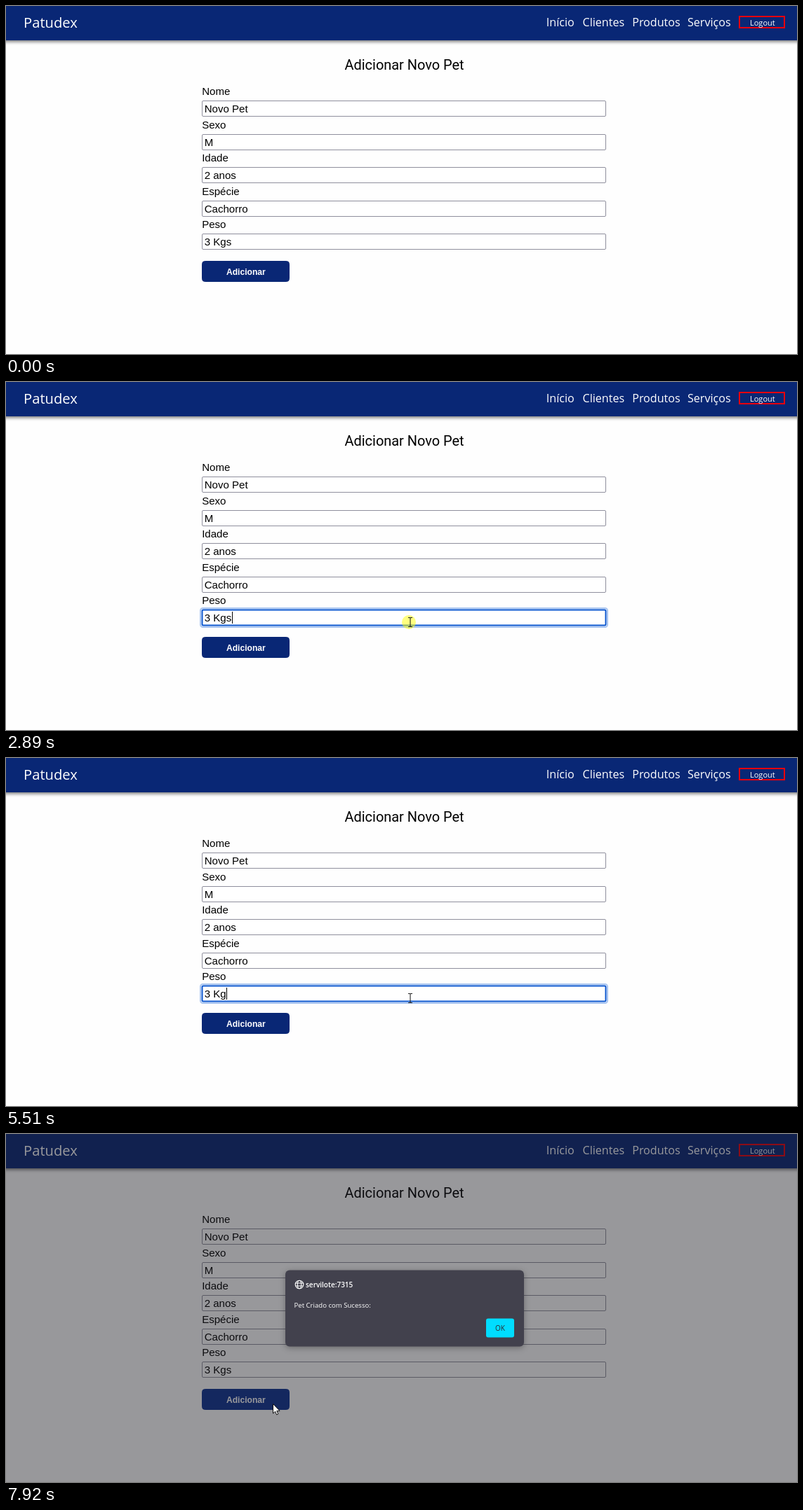
Write an HTML page that moves like this. It is 1127x497 px and loops after 8 s.

```html
<!DOCTYPE html>
<html lang="pt">
<head>
<meta charset="utf-8">
<title>Adicionar Novo Pet</title>
<style>
html, body { margin: 0; width: 100%; height: 100%; overflow: hidden; background: #fefefe; }
svg { display: block; }
text { white-space: pre; }
.form { font: 15.05px "Liberation Sans", Arial, sans-serif; }
.ui { font-family: "Open Sans", "Noto Sans", sans-serif; fill: #fff; }
.field { fill: #fff; stroke: #8f8f9d; }
.field.hover { stroke: #5b5b66; }
.field.focus { stroke: #0b57d0; stroke-width: 2; }
.bold { font: bold 12.1px "Liberation Sans", Arial, sans-serif; fill: #fff; }
#button rect { fill: #092775; stroke: #092775; }
#button.hover rect { fill: #0f3391; stroke: #0f3391; }
#button.pressed rect { fill: #0b2c85; stroke: #0b2c85; }
#button.off rect { fill: #ccc; stroke: #999; }
#button.off text { fill: #666; }
</style>
</head>
<body>
<svg width="1127" height="497" viewBox="0 0 1127 497">
  <defs>
    <filter id="navShadow" x="-5%" y="-50%" width="110%" height="220%" color-interpolation-filters="sRGB">
      <feDropShadow dx="0" dy="2" stdDeviation="2.4" flood-opacity=".55"/>
    </filter>
    <filter id="boxShadow" x="-10%" y="-20%" width="120%" height="150%" color-interpolation-filters="sRGB">
      <feDropShadow dx="0" dy="2" stdDeviation="4" flood-opacity=".3"/>
    </filter>
  </defs>
  <rect width="1127" height="497" fill="#fefefe"/>

  <rect x="-20" y="-20" width="1167" height="69" fill="#092775" filter="url(#navShadow)"/>
  <g class="ui" font-size="16.1">
    <text x="25" y="31" font-size="20.2">Patudex</text>
    <text x="769.8" y="29">Início</text>
    <text x="821.5" y="29">Clientes</text>
    <text x="892.2" y="29">Produtos</text>
    <text x="971" y="29">Serviços</text>
    <rect x="1045" y="15" width="64" height="16" fill="none" stroke="#e8000d" stroke-width="2"/>
    <text x="1060" y="27.5" font-size="11">Logout</text>
  </g>

  <text x="482.5" y="91" font-family="Roboto, sans-serif" font-size="19.95">Adicionar Novo Pet</text>
  <g id="form" class="form"></g>
  <text id="error" class="form" x="279.2" y="365" fill="#f00">Esse campo é obrigatório</text>
  <rect id="caret" y="328" width="1" height="17"/>
  <g id="button">
    <rect x="279.5" y="364.5" width="124" height="29" rx="4"/>
    <text class="bold" x="314" y="384">Adicionar</text>
  </g>

  <g id="alert">
    <rect width="1127" height="497" fill="#1c1b22" fill-opacity=".45"/>
    <rect x="398" y="194.5" width="340" height="109" rx="6" fill="#42414d" filter="url(#boxShadow)"/>
    <g fill="none" stroke="#fff" stroke-width="1.1">
      <circle cx="418" cy="215" r="5.8"/>
      <ellipse cx="418" cy="215" rx="2.7" ry="5.8"/>
      <path d="M412.5 213h11M412.5 217h11"/>
    </g>
    <g class="ui">
      <text x="427" y="218.5" font-size="10" font-weight="600">servilote:7315</text>
      <text x="410.5" y="247.5" font-size="9.6">Pet Criado com Sucesso:</text>
    </g>
    <rect x="684" y="263.5" width="40" height="27" rx="3" fill="#00ddff"/>
    <text class="ui" x="704" y="281" font-size="10" text-anchor="middle" style="fill:#2b2a33">OK</text>
  </g>

  <circle id="click" r="10" fill="#ff0" fill-opacity=".5"/>
  <g id="cursor">
    <path id="ibeam" d="M-3 -6.5h2.2l.8 .7l.8 -.7h2.2M0 -6V6M-3 6.5h2.2l.8 -.7l.8 .7h2.2" fill="none" stroke="#222" stroke-width="1.1"/>
    <path id="arrow" d="M.5 .5V14l3.1 -2.8l2 4.7l2.2 -1l-2 -4.5h4.2z" fill="#fff" stroke="#111" stroke-linejoin="round"/>
    <path id="hand" d="M-1.4 1.6q0 -1.4 1.4 -1.4t1.4 1.4v5q2.4 -.5 2.6 .8q2 -.3 2.2 .9q1.8 0 1.8 1.8v3.4q0 1.6 -1.4 3v1.6h-6.2v-1.4q-1.6 -1.4 -3 -4.2l-2 -2.6q-.3 -1.6 1.2 -1.4l2 1.6z
      M1.4 6.6v3M4 7.4v2.4M6.2 8.3v2" fill="#fff" stroke="#111" stroke-linejoin="round"/>
  </g>
</svg>
<script>
const LOOP = 8000;
const $ = id => document.getElementById(id);
const show = (id, on) => { $(id).style.display = on ? '' : 'none'; };
const within = (t, a, b) => t >= a && t < b;

const rows = [['Nome', 'Novo Pet'], ['Sexo', 'M'], ['Idade', '2 anos'], ['Espécie', 'Cachorro'], ['Peso', '3 Kgs']];
$('form').innerHTML = rows.map(([label, value], i) => {
  const y = Math.round(135 + 47.5 * i);
  const ring = i === 4
    ? '<rect id="ring" x="277" y="323" width="580" height="27" rx="3.5" fill="none" stroke="#a9c5f0" stroke-width="2"/>' : '';
  return `<text x="279.2" y="${y - 8}">${label}</text>${ring}` +
    `<rect class="field" x="279.5" y="${y + .5}" width="575" height="22" rx="1.5"/>` +
    `<text class="value" x="282.7" y="${y + 17}">${value}</text>`;
}).join('');
const fields = [...document.querySelectorAll('.field')];
const weight = [...document.querySelectorAll('.value')].pop();
const weightField = fields[4];

// time, text, caret visible
const typing = [
  [0, '3 Kgs', 0], [2890, '3 Kgs', 1], [3240, '3 Kgs', 0], [3370, '3 Kg', 1],
  [3770, '3 K', 1], [3835, '3', 1], [3900, '', 0], [4360, '', 1],
  [4780, '3', 1], [4980, '3', 0], [5050, '3 ', 1], [5380, '3 K', 1],
  [5510, '3 Kg', 1], [5710, '3 Kgs', 1], [5970, '3 Kgs', 0], [6430, '3 Kgs', 1], [7250, '3 Kgs', 0]
];

const pen = document.createElement('canvas').getContext('2d');
pen.font = '15.05px "Liberation Sans", Arial, sans-serif';

// The pointer is sampled in steps, as a screen recorder does.
function pointer(t) {
  if (t < 1220) return null;
  if (t < 1285) return [1119, 491];
  if (t < 1350) return [1097, 480];
  if (t < 1690) return [1116, 486];
  if (t < 6230) {
    const k = Math.min(10, Math.floor((t - 1690) / 66));
    const f = k === 10 ? 0 : .528 ** (k + 1);
    return [576 + 540 * f, 343 + 143 * f * f];
  }
  const k = Math.min(9, Math.floor((t - 6230) / 69));
  const f = (1 + Math.cos(Math.PI * (k + 1) / 10)) / 2;
  return [380 + 196 * f ** 1.35, 385 - 42 * f ** .7];
}

function draw(t) {
  const [, text, caretOn] = typing.findLast(step => t >= step[0]);
  const empty = text === '';
  const focus = within(t, 2890, 7250);
  const shift = empty ? 1 : 0;

  weight.textContent = text || 'Peso do Pet';
  weight.setAttribute('fill', empty ? '#757575' : '#000');
  show('caret', caretOn);
  $('caret').setAttribute('x', Math.round(283.2 + pen.measureText(text).width));

  fields.forEach(f => f.setAttribute('transform', `translate(${shift})`));
  $('ring').setAttribute('transform', `translate(${shift})`);
  show('ring', focus);
  show('error', empty);

  const p = pointer(t);
  let over = '';
  if (p) {
    const [x, y] = p;
    if (within(x, 279, 855) && within(y, 325, 348)) over = 'field';
    if (within(x, 279, 404) && within(y, 364, 394) && !empty) over = 'button';
    $('cursor').setAttribute('transform', `translate(${Math.round(x)} ${Math.round(y)})`);
  }
  show('cursor', p);
  show('ibeam', over === 'field');
  show('hand', over === 'button' && t < 7720);
  show('arrow', !over || t >= 7720);

  weightField.setAttribute('class', 'field ' + (focus ? 'focus' : over === 'field' ? 'hover' : ''));
  const pressed = within(t, 7250, 7320);
  $('button').setAttribute('class', empty ? 'off' : pressed ? 'pressed' : over === 'button' ? 'hover' : '');
  $('button').setAttribute('transform', `translate(${shift} ${empty ? 42 : 0})`);

  const first = within(t, 2750, 2960);
  show('click', first || within(t, 7120, 7520));
  $('click').setAttribute('transform', first ? 'translate(574 343)' : 'translate(380 385)');
  show('alert', t >= 7920);
}

const start = performance.now();
function tick() {
  draw((performance.now() - start) % LOOP);
  requestAnimationFrame(tick);
}
tick();
</script>
</body>
</html>
```
